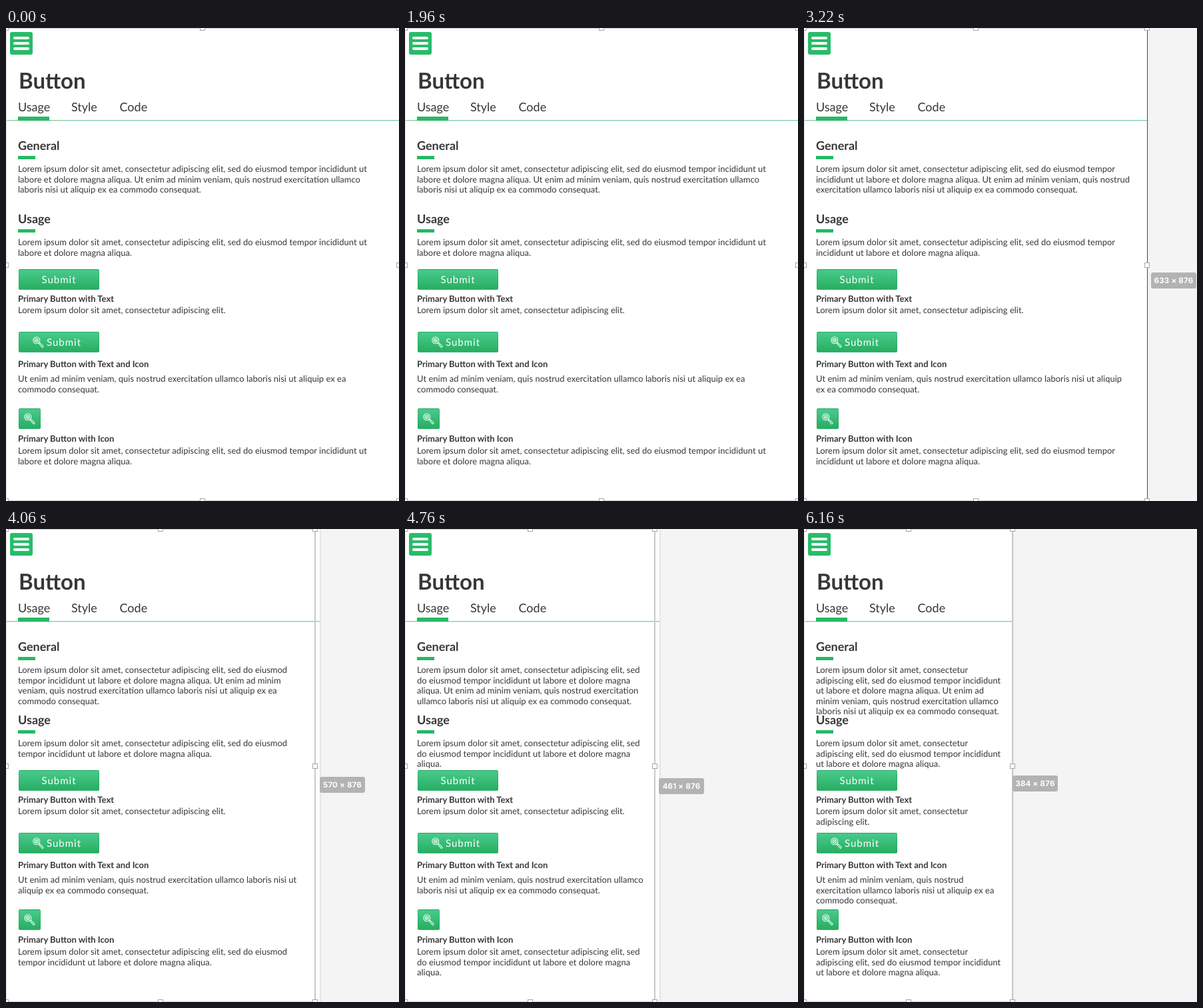
Recreate the animation shown at these times as an HTML page. Size 590 by 710 pixels, loop 6.23 s.

```html
<!DOCTYPE html>
<html lang="en">
<head>
<meta charset="utf-8">
<title>Responsive button page</title>
<style>
html, body { margin: 0; width: 100%; height: 100%; overflow: hidden; }
#stage { position: relative; width: 590px; height: 710px; overflow: hidden; background: #f4f4f4; font-family: Lato, Carlito, sans-serif; color: #373737; text-rendering: geometricPrecision; }
#stage * { position: absolute; box-sizing: border-box; }
#page { left: 0; top: 0; height: 710px; background: #fff; box-shadow: 0 0 3px rgba(0,0,0,.22); }
.t { white-space: nowrap; }
.body { white-space: normal; font-size: 13px; line-height: 15.5px; }
.bar { background: #27b966; }
#rule { left: 0; top: 138px; height: 2px; background: linear-gradient(#8ad2b1 50%, #c9eadb 50%); }
.btn { left: 19px; height: 31px; border-radius: 2px; background: linear-gradient(#49ca8c, #27ae61); border: 1px solid rgba(30,150,85,.35); }
#menu { left: 6px; top: 6px; width: 34px; height: 34px; border-radius: 3px; background: #28bc69; }
#menu i { left: 5px; width: 24px; height: 4px; border-radius: 2px; background: #fff; }
.btn span { color: #fff; font-size: 15px; letter-spacing: 1px; line-height: 30px; top: 0; }
.btn svg { width: 17px; height: 17px; overflow: visible; fill: none; stroke: #e9fff3; stroke-width: 1.1; }
#edge { top: 0; height: 710px; }
.handle { width: 8px; height: 8px; margin: -4px; background: #fff; border: 1px solid #a6a6a6; }
.frame { left: 0; height: 1px; background: #cfcfcf; }
#tag { width: 68px; height: 24px; border-radius: 3px; background: #b3b3b3; color: #fff; font: 700 11.5px/24px Inter, sans-serif; text-align: center; white-space: nowrap; letter-spacing: .2px; }
</style>
</head>
<body>
<div id="stage"></div>
<script>
const LOOP = 6230, STEP = 70, SCALE = 0.8143, LAG = 120;
const stage = document.getElementById('stage');

function add(cls, css, html = '', parent = stage) {
  const el = document.createElement('div');
  el.className = cls;
  Object.assign(el.style, css);
  el.innerHTML = html;
  parent.append(el);
  return el;
}
const px = n => n + 'px';

const page = add('', {});
page.id = 'page';
const rule = add('', {});
rule.id = 'rule';

function label(x, base, size, weight, text) {
  add('t', { left: px(x), top: px(base - size * 0.987), fontSize: px(size), lineHeight: 1.2, fontWeight: weight }, text);
}
label(19, 93, 33, 700, 'Button');
label(18, 126, 18, 400, 'Usage');
label(98, 126, 18, 400, 'Style');
label(170.5, 126, 18, 400, 'Code');
label(18, 184, 18, 700, 'General');
label(18, 294, 18, 700, 'Usage');
label(18, 412, 13, 700, 'Primary Button with Text');
label(18, 510, 13, 700, 'Primary Button with Text and Icon');
label(18, 622, 13, 700, 'Primary Button with Icon');

for (const [y, w] of [[133, 47], [192, 26], [302, 26]])
  add('bar', { left: '18px', top: px(y), width: px(w), height: y < 140 ? '6px' : '5px' });

// Paragraphs: first baseline, right edge as a share of the page, text.
const lorem = 'Lorem ipsum dolor sit amet, consectetur adipiscing elit';
const tempor = lorem + ', sed do eiusmod tempor incididunt ut labore et dolore magna aliqua.';
const enim = 'Ut enim ad minim veniam, quis nostrud exercitation ullamco laboris nisi ut aliquip ex ea commodo consequat.';
const paragraphs = [
  [217, .968, tempor + ' ' + enim],
  [327, .968, tempor],
  [429, .968, lorem + '.'],
  [532, .9515, enim],
  [640, .9515, tempor]
].map(([base, share, text]) => ({ share, el: add('body', { left: '18px', top: px(base - 12.8) }, text) }));

const lens = '<circle cx="5.8" cy="5.8" r="5"/><circle cx="5.8" cy="5.8" r="2.6"/><path d="M5.8 4.4v2.8M4.4 5.8h2.8M9.2 10.4l1.2-1.2 5.2 5a1.2 1.2 0 0 1-1.7 1.7z"/>';
function button(y, w, textX, iconX) {
  const icon = iconX ? `<svg style="left:${iconX}px;top:6px">${lens}</svg>` : '';
  const text = textX ? `<span style="left:${textX}px">Submit</span>` : '';
  add('btn', { top: px(y), width: px(w) }, icon + text);
}
button(362, 121, 33.5);
button(456, 121, 41, 19.5);
button(571, 33, 0, 6.5);

add('', {}, [7, 15, 23].map(y => `<i style="top:${y}px"></i>`).join('')).id = 'menu';

const top0 = add('frame', { top: 0 });
const bottom = add('frame', { top: '709px' });
add('', { left: 0, top: 0, width: '1px', height: '710px', background: '#e6e6e6' });
const edge = add('', {});
edge.id = 'edge';
const handles = [0, 355.5, 710].flatMap(y => [0, .5, 1]
  .filter(k => y !== 355.5 || k !== .5)
  .map(k => ({ k, el: add('handle', { top: px(y) }) })));
const tag = add('', {});
tag.id = 'tag';

// Time, artboard width, tag left, tag top.
const moves = [
  [0, 724.6, 597, 365], [2240, 724.6, 597, 365], [3080, 633, 523, 366],
  [3220, 633, 521, 367], [3360, 600, 494, 369], [3430, 600, 494, 369],
  [3940, 579, 478, 371], [4060, 570, 471, 372], [4290, 524.5, 434, 371],
  [4410, 503, 417, 370], [4690, 462, 382, 373], [4900, 459, 380, 375],
  [4970, 459, 380, 375], [5200, 436, 364, 376], [5320, 436, 362, 377],
  [5600, 408, 339, 374], [6030, 384, 315, 370], [6230, 384, 312, 370]
];
function at(t, col) {
  const i = Math.max(1, moves.findIndex(m => m[0] >= t));
  const a = moves[i - 1], b = moves[i];
  return a[col] + (b[col] - a[col]) * (t - a[0]) / (b[0] - a[0]);
}

function draw(now) {
  const t = Math.floor((now % LOOP) / STEP) * STEP;
  const units = at(t, 1), w = Math.round(units * SCALE);
  const pageW = Math.round(at(Math.max(0, t - LAG), 1) * SCALE);
  page.style.width = rule.style.width = px(pageW);
  for (const p of paragraphs) p.el.style.width = px(pageW * p.share - 18);
  top0.style.width = bottom.style.width = px(w);
  const snapped = t >= 3080 && t <= 3220;
  edge.style.left = px(snapped ? w : w - 1);
  edge.style.width = snapped ? '1px' : '2px';
  edge.style.background = snapped ? '#7d3a3a' : '#c9c9c9';
  edge.style.visibility = w < 590 ? 'visible' : 'hidden';
  for (const h of handles) h.el.style.left = px(w * h.k);
  tag.style.left = px(Math.round(at(t, 2)));
  tag.style.top = px(Math.round(at(t, 3)));
  tag.textContent = `${Math.round(units)} × 876`;
}

const start = performance.now();
function tick() {
  draw(performance.now() - start);
  requestAnimationFrame(tick);
}
draw(0);
tick();
</script>
</body>
</html>
```
